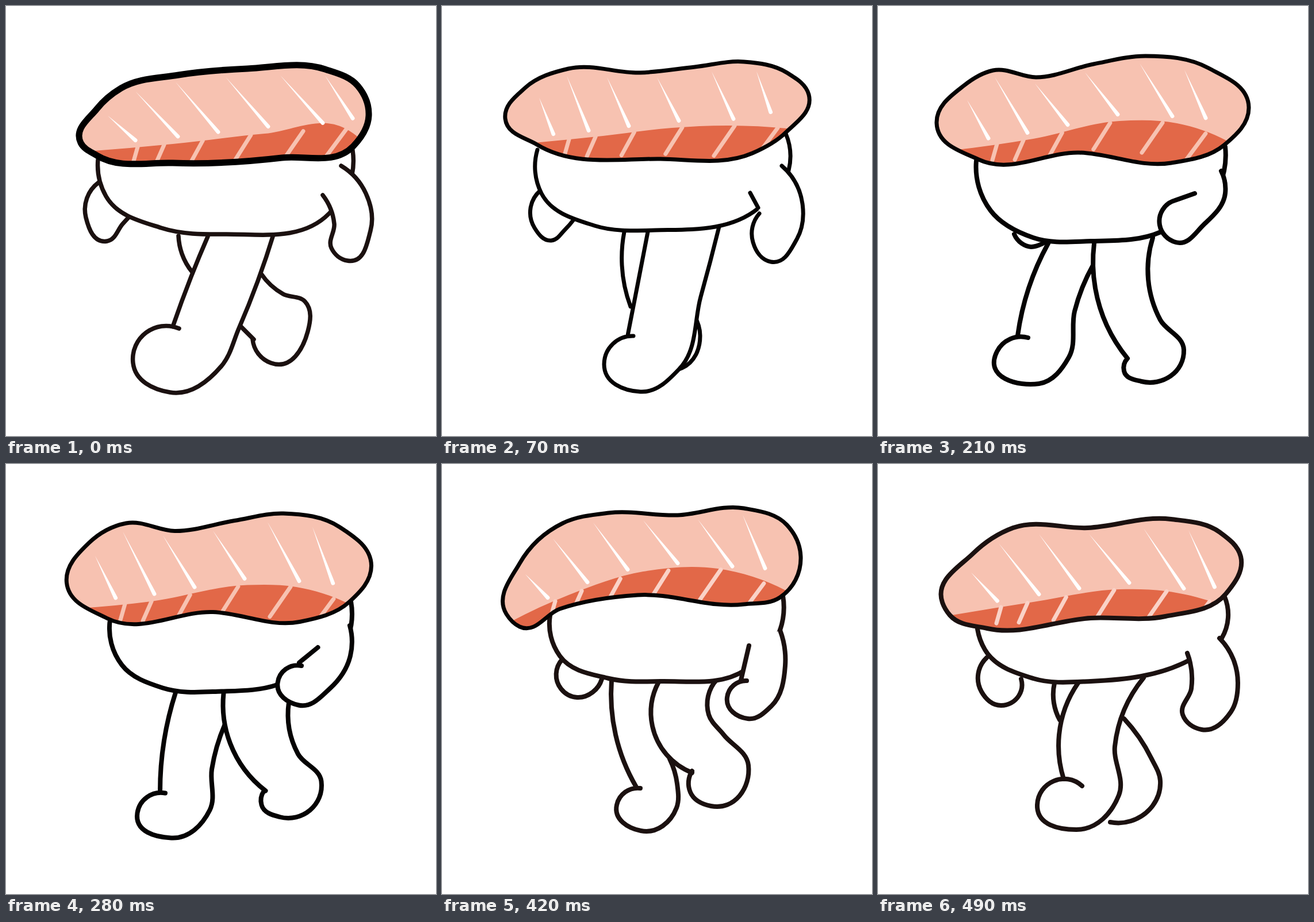
An HTML page that plays this animation: 748 by 748 pixels, repeating every 0.56 s.

```html
<!DOCTYPE html>
<html lang="en">
<head>
<meta charset="utf-8">
<title>Walking salmon sushi</title>
<style>
  html, body { margin: 0; width: 100%; height: 100%; overflow: hidden; background: #fff; }
  svg { display: block; width: 100%; height: 100%; }
  path { stroke-linecap: round; stroke-linejoin: round; }
</style>
</head>
<body>
<svg id="stage" viewBox="0 -1 748 748"></svg>
<script>
const STEP = 70;
const LIGHT = '#f7c2b1', DARK = '#e26848', PALE = '#fad2c7', WARM = '#1b1110', BLACK = '#050303';
const GRAIN = [0, 48, 118, 205, 300, 378];   // spacing of the stripes, from the leftmost one

// Key points "x y" of smooth runs, separated by "/".
// fish: clockwise from its left tip; band: upper edge of the dark side;
// limbs: down one side, around the foot or hand, up the other side.
// left and slant place the stripes.
const stride = {
  fish: '130 237 158 178 200 142 300 119 420 108 555 109 612 138 631 190 604 243 480 263 290 272 158 259',
  band: '140 252 290 239 450 221 590 212 618 232',
  body: '160 266 174 330 270 385 380 396 562 360 602 292 603 250',
  farArm: '161 306 139 367 176 408 203 378 214 366',
  backLeg: '300 399 306 430 324 462 / 444 465 482 500 520 513 525 565 461 620 429 579 / 431 579 408 556',
  nearLeg: '351 400 322 470 290 557 / 301 560 221 620 285 671 375 625 405 560 466 394',
  nearArm: '583 277 626 325 634 390 594 442 566 420 571 378 551 328',
  left: 177, slant: 74, line: 7.5, rim: 11, ink: WARM, rimInk: '#000', tint: LIGHT
};

const passing = {
  fish: '110 195 145 141 220 108 345 115 440 105 525 96 600 115 638 153 598 219 540 255 380 265 165 240',
  band: '160 237 280 225 400 211 500 207 600 212',
  body: '166 249 173 325 265 381 370 389 550 351 603 285 598 221',
  farArm: '171 320 161 385 190 407 214 388 228 372',
  backLeg: '317 392 313 450 328 522 / 335 555 330 590 385 632 417 629 449 572 440 540',
  nearLeg: '358 392 340 485 323 572 / 333 573 282 622 345 670 413 630 450 505 482 383',
  nearArm: '591 277 627 343 617 405 572 444 541 410 552 360 / 550 350 536 324',
  left: 169, slant: 38, line: 7, rim: 7, ink: BLACK, rimInk: BLACK, tint: LIGHT
};

const apart = {
  fish: '102 203 150 137 200 111 275 123 375 100 465 86 575 107 645 175 602 241 510 272 350 254 175 266',
  band: '130 250 270 230 420 199 520 203 612 236',
  body: '171 268 196 355 270 402 370 408 492 392 602 286 604 244',
  farArm: '237 396 250 412 266 418 280 415 292 409',
  backLeg: '296 412 262 490 243 572 / 261 576 207 600 280 656 332 610 342 530 374 450',
  nearLeg: '376 412 378 490 434 612 / 434 612 428 634 458 652 532 597 491 545 478 402',
  nearArm: '597 286 604 325 567 379 518 410 490 380 517 337 / 517 337 551 325',
  left: 155, slant: 57, line: 8, rim: 7, ink: BLACK, rimInk: BLACK, tint: LIGHT
};

const lifted = {
  fish: '109 208 138 136 218 93 312 108 420 95 500 84 585 110 626 176 592 237 512 275 370 259 175 268',
  band: '125 250 235 246 420 220 490 223 580 248',
  body: '191 272 207 342 275 375 380 381 452 374 599 272 596 232',
  farArm: '250 330 265 340 285 342 300 340 315 335',
  backLeg: '294 381 288 470 293 566 / 293 567 250 612 295 643 377 592 374 530 387 455',
  nearLeg: '381 384 402 480 469 523 / 463 524 461 550 494 574 565 505 525 462 506 425',
  nearArm: '599 274 594 340 560 400 500 427 455 380 511 363 / 503 352 534 311',
  left: 155, slant: 53, line: 8, rim: 7, ink: BLACK, rimInk: BLACK, tint: LIGHT
};

const returning = {
  fish: '112 260 135 172 210 102 290 84 410 88 525 76 600 105 624 160 588 231 525 243 340 227 205 251 135 282',
  band: '120 273 220 227 350 186 480 181 598 219',
  body: '188 262 205 333 290 372 380 377 528 357 588 288 593 228',
  farArm: '209 339 207 390 235 405 262 396 278 373',
  backLeg: '295 375 302 470 338 561 / 345 563 304 592 346 637 408 597 409 555 396 512',
  nearLeg: '377 378 366 455 435 536 / 435 533 432 570 468 594 533 523 490 470 464 435 478 374',
  nearArm: '588 288 597 350 573 420 532 442 496 405 530 376 / 520 375 534 315',
  left: 145, slant: 60, line: 8, rim: 7, ink: WARM, rimInk: BLACK, tint: PALE
};

const reaching = {
  fish: '112 240 165 155 235 110 365 110 510 95 595 118 631 160 605 225 500 264 370 267 190 285 125 262',
  band: '128 262 270 239 420 217 500 220 585 240',
  body: '173 286 186 322 270 372 370 377 540 341 598 302 603 230',
  farArm: '189 336 180 395 214 419 245 402 249 373',
  backLeg: '307 380 306 415 316 444 / 428 442 475 510 491 550 440 620 404 622',
  nearLeg: '348 380 315 470 323 547 / 355 559 277 592 345 635 419 575 412 490 462 371',
  nearArm: '594 302 626 380 614 430 563 461 530 435 545 390 538 328',
  left: 162, slant: 70, line: 8, rim: 8, ink: WARM, rimInk: WARM, tint: PALE
};

// Halfway between two values, or point by point between two runs of points.
function halfway(a, b) {
  if (typeof a === 'number') return (a + b) / 2;
  if (!a.includes(' ')) return b;
  const other = b.split(' ');
  return a.split(' ').map((n, i) => n === '/' ? n : halfway(+n, +other[i])).join(' ');
}

const between = (a, b) =>
  Object.fromEntries(Object.keys(a).map(key => [key, halfway(a[key], b[key])]));

const walk = [stride, passing, between(passing, apart), apart,
              between(apart, lifted), lifted, returning, reaching];

function pointsOf(text) {
  const n = text.trim().split(' ').map(Number);
  return n.flatMap((x, i) => i % 2 ? [] : [[x, n[i + 1]]]);
}

const sub = (a, b) => [a[0] - b[0], a[1] - b[1]];
const dot = (a, b) => a[0] * b[0] + a[1] * b[1];
const move = (p, v, k) => [p[0] + v[0] * k, p[1] + v[1] * k];
function unit(v) {
  const len = Math.hypot(...v) || 1;
  return [v[0] / len, v[1] / len];
}

// Tangent of the circle through three neighbouring points.
function tangent(a, b, c) {
  const u = sub(b, a), v = sub(c, b);
  return unit(move(move([0, 0], u, 1 / (dot(u, u) || 1)), v, 1 / (dot(v, v) || 1)));
}

function mirror(t, chord) {
  const c = unit(chord);
  return sub(move([0, 0], c, 2 * dot(c, t)), t);
}

// Curve through the points; equal turns at both ends of a piece give a circular arc.
function smooth(points, closed = false, start = 'M') {
  const n = points.length, at = i => points[(i + n) % n];
  const tangents = points.map((p, i) => tangent(at(i - 1), p, at(i + 1)));
  if (!closed) {
    const chord = sub(at(1), at(0));
    tangents[0] = n > 2 ? mirror(tangents[1], chord) : unit(chord);
    tangents[n - 1] = n > 2 ? mirror(tangents[n - 2], sub(at(n - 1), at(n - 2))) : unit(chord);
  }
  let d = start + at(0);
  for (let i = 0; i < (closed ? n : n - 1); i++) {
    const a = at(i), b = at(i + 1), chord = sub(b, a);
    const handle = t => Math.hypot(...chord) * 2 / 3 / (1 + Math.max(0, dot(t, unit(chord))));
    const s = tangents[i], e = tangents[(i + 1) % n];
    d += `C${move(a, s, handle(s))} ${move(b, e, -handle(e))} ${b}`;
  }
  return closed ? d + 'Z' : d;
}

// Height of the first stretch, going right, that spans x.
function heightAt(points, x) {
  const i = points.findIndex((p, k) => k && points[k - 1][0] <= x && x <= p[0]);
  if (i < 0) return points[points.length - 1][1];
  const [a, b] = [points[i - 1], points[i]];
  return a[1] + (b[1] - a[1]) * (x - a[0]) / (b[0] - a[0]);
}

// Starts as a point and swells to a round end.
function wedge(from, to, r) {
  const [dx, dy] = unit(sub(to, from)), side = [-dy, dx];
  return `M${from}L${move(to, side, r)}A${r},${r} 0 0 0 ${move(to, side, -r)}Z`;
}

// White stripes run from the rim to the band; the outer two are shorter.
function whiteStripes(pose, rim, band) {
  return GRAIN.map((offset, i) => {
    const x = pose.left + offset;
    const end = x + pose.slant * (i % 5 ? 1 : 0.65);
    const from = [x, heightAt(rim, x) + (i ? 11 : 28)];
    const to = [end, heightAt(band, end) - (i < 5 ? 12 : 27)];
    return wedge(from, to, 3.4);
  }).join('');
}

// Dark-side stripes lean the other way, more so towards the right.
function tintStripes(pose, band) {
  return GRAIN.map((offset, i) => {
    const x = pose.left + 52 + offset * 0.96;
    return `M${x},${heightAt(band, x)}l${-8 - 7 * i},${28 + 6 * i}`;
  }).join('');
}

function add(parent, tag, attributes = {}) {
  const node = document.createElementNS('http://www.w3.org/2000/svg', tag);
  for (const key in attributes) node.setAttribute(key, attributes[key]);
  return parent.appendChild(node);
}

const addLine = (parent, d, stroke, width) =>
  add(parent, 'path', { d, fill: 'none', stroke, 'stroke-width': width });

function drawLimb(group, text, pose) {
  const runs = text.split('/').map(pointsOf);
  add(group, 'path', { d: runs.map((run, i) => smooth(run, false, i ? 'L' : 'M')).join(''), fill: '#fff' });
  addLine(group, runs.map(run => smooth(run)).join(''), pose.ink, pose.line);
}

function drawFish(group, pose, id) {
  const rim = pointsOf(pose.fish), band = pointsOf(pose.band);
  const outline = smooth(rim, true);
  add(add(group, 'clipPath', { id }), 'path', { d: outline });
  const slice = add(group, 'g', { 'clip-path': `url(#${id})` });
  add(slice, 'path', { d: outline, fill: LIGHT });
  add(slice, 'path', { d: `${smooth(band)}V320H${band[0][0]}Z`, fill: DARK });
  addLine(slice, tintStripes(pose, band), pose.tint, 7);
  add(slice, 'path', { d: whiteStripes(pose, rim, band), fill: '#fff' });
  addLine(group, outline, pose.rimInk, pose.rim);
}

function drawPose(pose, index) {
  const group = add(document.getElementById('stage'), 'g', { opacity: 0 });
  for (const part of ['farArm', 'backLeg', 'nearLeg', 'body']) drawLimb(group, pose[part], pose);
  drawFish(group, pose, 'slice' + index);
  drawLimb(group, pose.nearArm, pose);
  return group;
}

const loop = STEP * walk.length;
walk.map(drawPose).forEach((group, i) => {
  group.animate([
    { opacity: 1, offset: 0, easing: 'step-end' },
    { opacity: 0, offset: 1 / walk.length, easing: 'step-end' },
    { opacity: 0, offset: 1 }
  ], { duration: loop, iterations: Infinity, delay: i ? i * STEP - loop : 0 });
});
</script>
</body>
</html>
```
